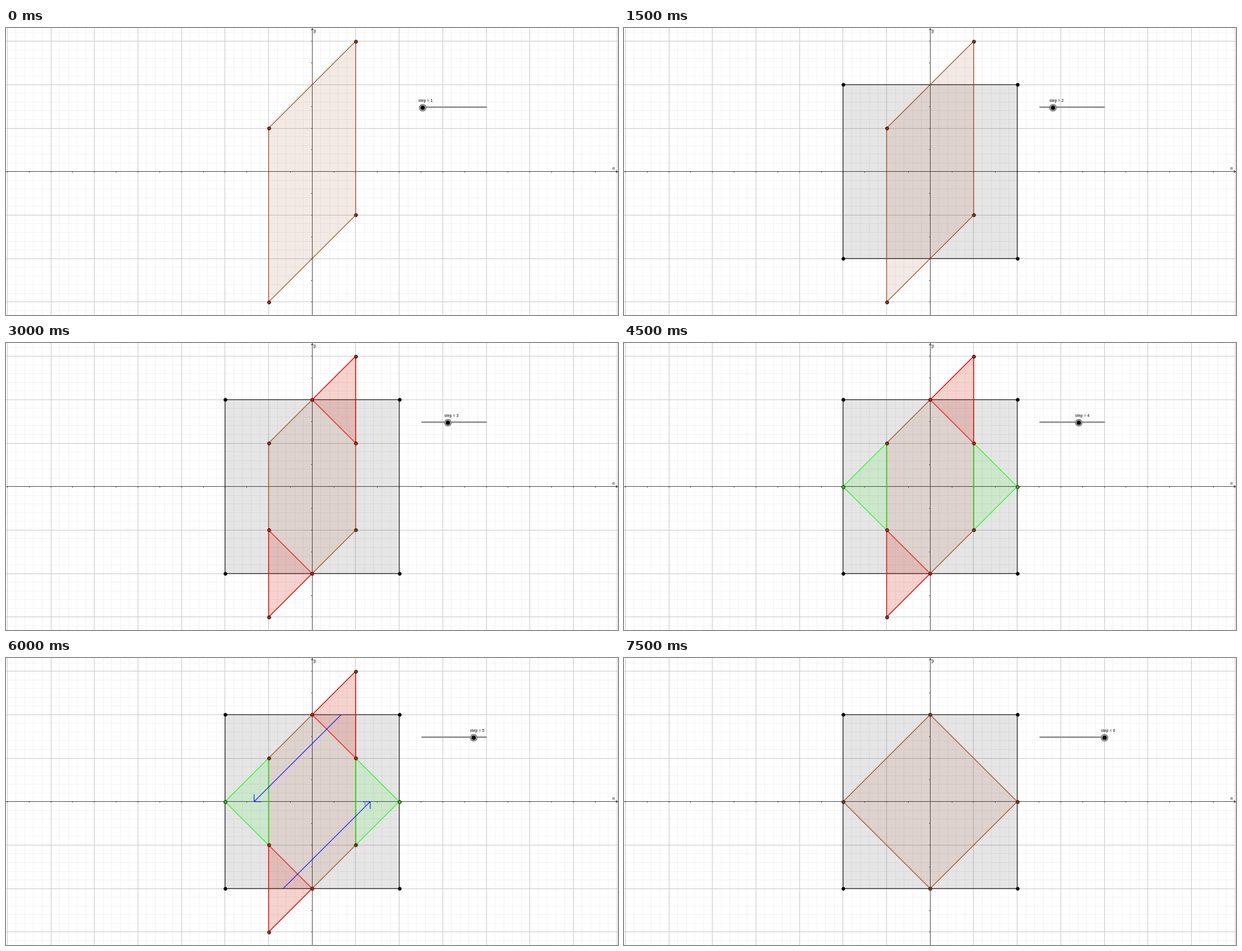
Animation, 1092 px wide and 513 px high, one loop 9 s. Source, as a matplotlib script:

```python
from math import floor

import matplotlib.pyplot as plt
from matplotlib.animation import FuncAnimation
from matplotlib.colors import to_rgba
from matplotlib.patches import Polygon

W, H, DPI = 1092, 513, 64
PX = 72 / DPI                      # one pixel in points
UNIT, CX, CY = 77.7, 546.25, 256.75
STEPS, STEP_MS = 6, 1500
BROWN, BLACK, RED, GREEN, BLUE = "#993300", "#000000", "#ff0000", "#00ff00", "#0000ff"

plt.rcParams["path.snap"] = False
fig = plt.figure(figsize=(W / DPI, H / DPI), dpi=DPI, facecolor="white")
ax = fig.add_axes([0, 0, 1, 1])
ax.set_xlim(0, W)
ax.set_ylim(H, 0)
ax.axis("off")

layers = []                        # (artist, steps in which it shows)
order = iter(range(1, 1000))       # drawing order


def pos(a, b):
    return CX + a * UNIT, CY - b * UNIT


def crisp(a, b):
    """Centre of the pixel that holds a point of the plane."""
    return tuple(floor(v) + 0.5 for v in pos(a, b))


def line(points, color, width=1.0, cap="butt"):
    xs, ys = zip(*points)
    return ax.plot(xs, ys, color=color, lw=width * PX, zorder=next(order),
                   solid_capstyle=cap, solid_joinstyle="miter")[0]


def disc(x, y, size, face, edge, width=1.0):
    return ax.plot([x], [y], "o", ms=size * PX, mfc=face, mec=edge,
                   mew=width * PX, zorder=next(order))[0]


def label(x, y, text, color="black", size=7.0):
    return ax.text(x, y, text, color=color, fontsize=size * PX, va="center",
                   family=["Liberation Sans", "DejaVu Sans"], zorder=next(order))


def show(artist, steps):
    layers.append((artist, set(steps)))


def shape(corners, color, steps, fill=0.1, stroke=0.8):
    patch = Polygon([pos(*c) for c in corners], closed=True, lw=1.4 * PX,
                    fc=to_rgba(color, fill), ec=to_rgba(color, stroke),
                    joinstyle="round", zorder=next(order))
    show(ax.add_patch(patch), steps)


def dots(corners, face, steps):
    for c in corners:
        show(disc(*pos(*c), 5.6, face, "#1a0a05"), steps)


def mirrored(points):
    return [(-a, -b) for a, b in points]


def draw_grid():
    for parts, color in ((5, "#f2f2f2"), (1, "#c6c6c6")):
        for k in range(-8 * parts, 8 * parts + 1):
            if parts > 1 and k % parts == 0:
                continue
            x, y = crisp(k / parts, k / parts)
            line([(x, 0), (x, H)], color)
            line([(0, y), (W, y)], color)


def draw_axes():
    ink = "#404040"
    x0, y0 = crisp(0, 0)
    line([(0, y0), (W, y0)], ink)
    line([(x0, 0), (x0, H)], ink)
    for k in range(-14, 15):
        if k:
            x, y = crisp(k / 2, k / 2)
            line([(x, y0), (x, y0 + 2)], ink)
            line([(x0 - 2, y), (x0, y)], ink)
    line([(x0 - 2, 4), (x0, 1), (x0 + 2, 4)], ink)
    line([(W - 4, y0 - 2), (W - 1, y0), (W - 4, y0 + 2)], ink)
    label(1082, 251.5, "α")
    label(548.5, 7, "β")


draw_grid()
draw_axes()

slanted = [(-1, 1), (1, 3), (1, -1), (-1, -3)]
square = [(-2, 2), (2, 2), (2, -2), (-2, -2)]
diamond = [(-2, 0), (0, 2), (2, 0), (0, -2)]
hexagon = [(-1, 1), (0, 2), (1, 1), (1, -1), (0, -2), (-1, -1)]
cut = [(0, 2), (1, 3), (1, 1)]
flap = [(1, 1), (2, 0), (1, -1)]

shape(square, BLACK, range(2, 7))
shape(slanted, BROWN, range(1, 6))
shape(diamond, BROWN, [6])
shape(hexagon, "#8c8c50", range(3, 6), fill=0, stroke=0.3)
for points in (cut, mirrored(cut)):
    shape(points, RED, range(3, 6))
for points in (flap, mirrored(flap)):
    shape(points, GREEN, range(4, 6))

# Arrows that carry the cut triangles to their new places
shaft, tip, barb = (-2 / 3, -2), (4 / 3, 0), 1 / 6
head = [(tip[0] - barb, 0), tip, (tip[0], -barb)]
for points in ([shaft, tip], head):
    for path in (points, mirrored(points)):
        show(line([pos(*p) for p in path], to_rgba(BLUE, 0.8), 1.4), [5])
show(label(639, 260.5, "τ,", "#3333cc"), [5])

dots(square, BLACK, range(2, 7))
dots(slanted, "#9b3512", range(1, 6))
dots(diamond, "#9b3512", [6])
dots([(0, 2), (1, 1), (0, -2), (-1, -1)], "#f01414", range(3, 6))
dots([(2, 0), (-2, 0)], "#33d01f", range(4, 6))

# Slider
SLIDER_X, SLIDER_Y, SLIDER_GAP = 742.5, 141.5, 22.9
line([(SLIDER_X, SLIDER_Y), (SLIDER_X + 5 * SLIDER_GAP, SLIDER_Y)],
     "#999999", 3, "round")
ring = disc(0, 0, 12.4, "#999999", "#7a7a7a")
knob = disc(0, 0, 6.4, "black", "black")
caption = label(0, 0, "")


def update(frame):
    step = frame % STEPS + 1
    for artist, steps in layers:
        artist.set_visible(step in steps)
    x = SLIDER_X + SLIDER_GAP * (step - 1)
    for part in (ring, knob):
        part.set_data([x], [SLIDER_Y])
    caption.set_position((x - 6.4, SLIDER_Y - 11))
    caption.set_text(f"step = {step}")
    return []


anim = FuncAnimation(fig, update, frames=STEPS, interval=STEP_MS,
                     init_func=lambda: update(0), repeat=True, repeat_delay=0)
plt.show()
```
